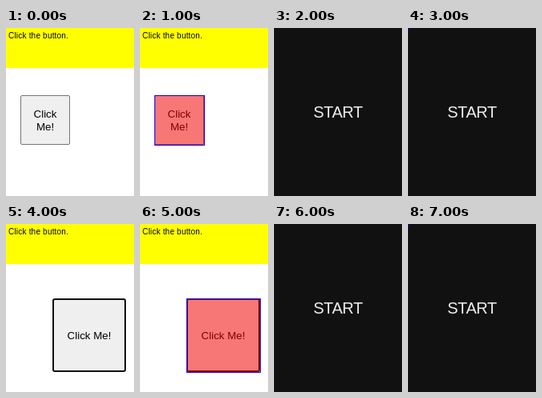
Animation of 160 by 210 pixels, one loop 8000 ms. Source, as an HTML page:

```html
<!DOCTYPE html>
<html lang="en">
<head>
<meta charset="utf-8">
<title>Click the button</title>
<style>
  html, body { margin: 0; width: 100%; height: 100%; overflow: hidden; background: #fff; }
  body, .btn { font-family: Arial, "Liberation Sans", sans-serif; }
  #stage { position: relative; width: 160px; height: 210px; overflow: hidden; }
  #stage > div { position: absolute; box-sizing: border-box; }
  #query { left: 0; top: 0; width: 160px; height: 50px; padding: 3px; background: #ff0; font-size: 10px; line-height: 13px; letter-spacing: .2px; }
  .btn {
    display: flex; align-items: center; justify-content: center; padding-top: 2px;
    border: 1px solid #767676; border-radius: 2px; background: #efefef;
    font-size: 13.3333px; line-height: 16px; text-align: center;
  }
  #small { left: 18px; top: 84px; width: 62px; height: 62px; }
  #large { left: 58px; top: 93px; width: 92px; height: 92px; border: 2px solid #101010; border-radius: 3px; }
  .mark { border: 1px solid #00f; background: rgba(255, 0, 0, .5); }
  #markSmall { left: 18px; top: 84px; width: 63px; height: 63px; }
  #markLarge { left: 58px; top: 93px; width: 93px; height: 93px; }
  #cover { left: 0; top: 0; width: 160px; height: 210px; background: #111; color: #eee; font-size: 20px; line-height: 210px; letter-spacing: -.4px; text-align: center; }
  #dot { left: 0; top: 0; width: 1px; height: 2px; background: #00f; }
</style>
</head>
<body>
<div id="stage">
  <div id="query">Click the button.</div>
  <div id="small" class="btn">Click<br>Me!</div>
  <div id="large" class="btn">Click Me!</div>
  <div id="markSmall" class="mark"></div>
  <div id="markLarge" class="mark"></div>
  <div id="cover">START</div>
  <div id="dot"></div>
</div>
<script>
  const STEP = 1000;
  // Parts visible during each step, on top of the query bar.
  const steps = [
    ['small'],
    ['small', 'markSmall'],
    ['cover'],
    ['cover', 'dot'],
    ['large'],
    ['large', 'markLarge'],
    ['cover'],
    ['cover', 'dot']
  ];
  const parts = [...new Set(steps.flat())].map(id => document.getElementById(id));
  const start = performance.now();

  function draw() {
    const t = Math.max(0, performance.now() - start);
    const shown = steps[Math.floor(t / STEP) % steps.length];
    for (const part of parts) part.style.visibility = shown.includes(part.id) ? 'visible' : 'hidden';
    requestAnimationFrame(draw);
  }
  draw();
</script>
</body>
</html>
```
